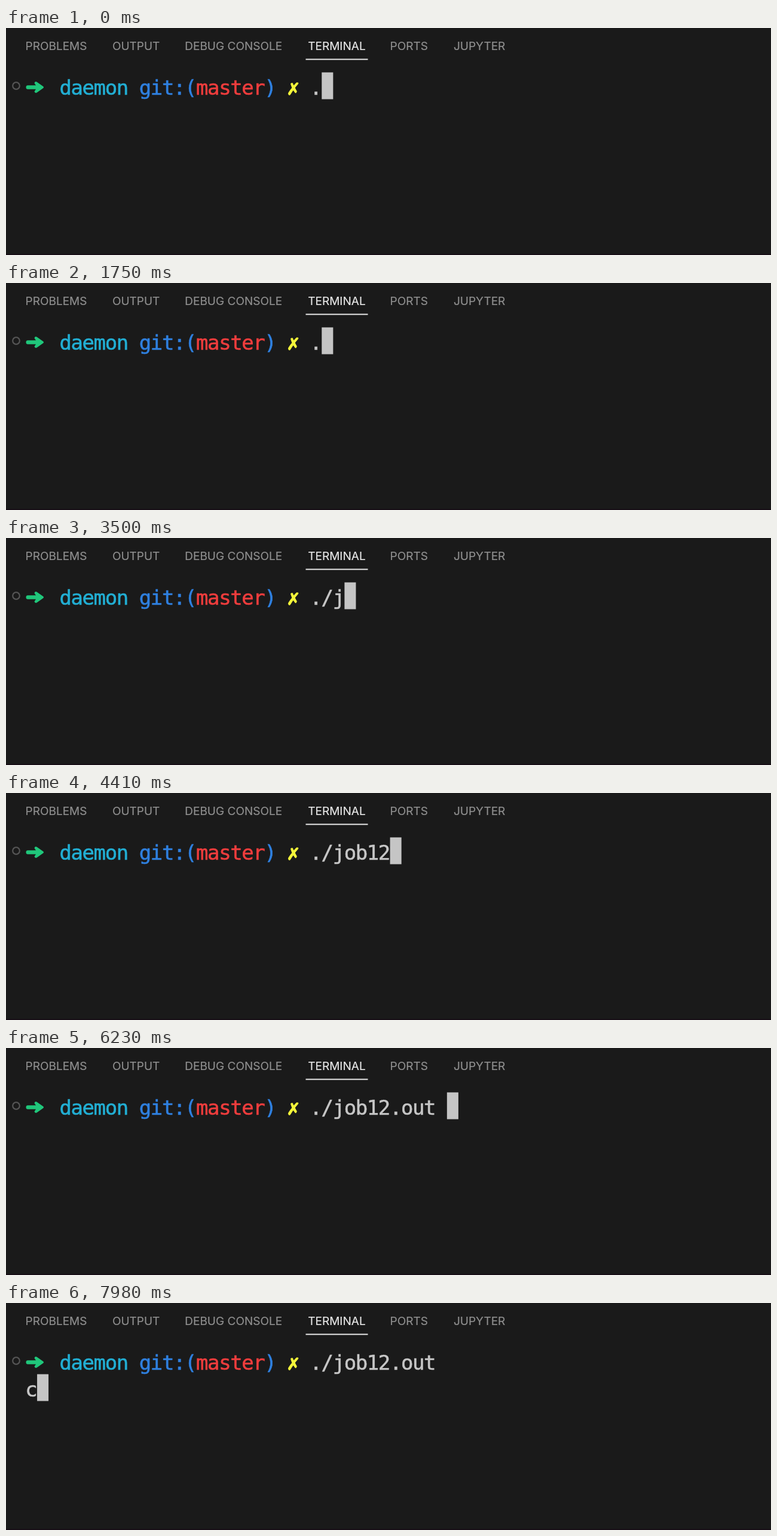
Recreate the animation shown at these times as an HTML page. Size 1280 by 381 pixels, loop 8 s.

```html
<!DOCTYPE html>
<html lang="en">
<head>
<meta charset="utf-8">
<title>Terminal</title>
<style>
  html, body { margin: 0; width: 100%; height: 100%; overflow: hidden; background: #1a1a1a; }
  svg { display: block; width: 100%; height: 100%; }
  .tab { font: 19px Inter, "Liberation Sans", sans-serif; stroke-width: 0.2; }
  .term { font: 34px "DejaVu Sans Mono", monospace; letter-spacing: -1.42px; white-space: pre; stroke-width: 0.6; }
</style>
</head>
<body>
<svg id="stage" viewBox="0 0 1280 381">
  <rect width="1280" height="381" fill="#1a1a1a"/>
  <rect y="379" width="1280" height="2" fill="#170f16"/>
  <g id="tabs"></g>
  <rect x="501.5" y="51.6" width="104" height="2" fill="#e7e7e7"/>
  <circle cx="17" cy="97" r="5.8" fill="none" stroke="#555" stroke-width="2.2"/>
  <path d="M36.5 96.2H50L47.5 92.5Q48.5 89 51.5 90.5L62.5 98.2Q63.7 99.5 62.5 100.8L51.5 108.5Q48.5 110 47.5 106.5L50 102.8H36.5Q33.5 102.8 33.5 99.5T36.5 96.2Z" fill="#20c77b"/>
  <g id="term"></g>
  <rect id="caret" width="19.05" height="45" fill="#c5c5c5"/>
  <path id="mouse" d="M1 1.5V27L7 21.3L11 31L15 29.3L11 19.8H18.5Z" fill="#111" stroke="#fff" stroke-width="1.9" stroke-linejoin="miter"/>
</svg>
<script>
const LOOP = 8000, STEP = 70;
const LEFT = 33, TOP = 74.5, CELL = 19.05, LINE = 45, BASE = 37.3;
const BEARING = -0.7; // centres the tightened glyphs in their cells
const $ = id => document.getElementById(id);

function addText(parent, cls, x, y, str, color) {
  const el = document.createElementNS("http://www.w3.org/2000/svg", "text");
  el.setAttribute("class", cls);
  el.setAttribute("x", x);
  el.setAttribute("y", y);
  el.style.fill = el.style.stroke = color;
  el.textContent = str;
  parent.appendChild(el);
  return el;
}

const cell = (col, row, str, color = "#c6c6c6") =>
  addText($("term"), "term", LEFT + BEARING + col * CELL, TOP + BASE + row * LINE, str, color);

[["PROBLEMS", 32.6], ["OUTPUT", 177.9], ["DEBUG CONSOLE", 299.3],
 ["TERMINAL", 505.3], ["PORTS", 642.6], ["JUPYTER", 749]].forEach(([name, x]) =>
  addText($("tabs"), "tab", x, 37.3, name, name === "TERMINAL" ? "#e7e7e7" : "#8e8e8e"));

cell(3, 0, "daemon", "#22afd4");
cell(10, 0, "git:(", "#2f80e0");
cell(15, 0, "master", "#ef3d3d");
cell(21, 0, ")", "#2f80e0");
cell(23, 0, "✗", "#f4f53a").style.strokeWidth = 1.2;

const CMD_COL = 25;
const command = cell(CMD_COL, 0, "");
const input = cell(0, 1, "");

// Command line contents from each moment on; the last jump is tab completion.
const typed = [
  [0, "."], [2030, ""], [2870, "."], [3080, "./"], [3360, "./j"],
  [3710, "./jo"], [3850, "./job"], [4060, "./job1"], [4270, "./job12"],
  [4620, "./job12.out "]
];
const ENTER = 6300, REPLY = 7840;

// Pointer keys: time, x, y
const path = [[1050, 1010, 223], [1190, 962, 212], [1680, 921, 186]];
const HIDE = 1750;

function pointerAt(t) {
  let i = 0;
  while (i < path.length - 2 && t >= path[i + 1][0]) i++;
  const [t0, x0, y0] = path[i], [t1, x1, y1] = path[i + 1];
  const k = Math.min(1, (t - t0) / (t1 - t0));
  const e = 1 - (1 - k) * (1 - k);
  return [x0 + (x1 - x0) * e, y0 + (y1 - y0) * e];
}

function draw(time) {
  const t = Math.floor((time % LOOP) / STEP) * STEP;
  const text = typed.filter(k => k[0] <= t).pop()[1];
  const entered = t >= ENTER;
  const reply = t >= REPLY ? "c" : "";
  command.textContent = text;
  input.textContent = reply;

  const col = entered ? reply.length : CMD_COL + text.length;
  $("caret").setAttribute("x", LEFT + col * CELL);
  $("caret").setAttribute("y", TOP + (entered ? LINE : 0));

  const shown = t >= path[0][0] && t < HIDE;
  $("mouse").style.display = shown ? "" : "none";
  if (shown) $("mouse").setAttribute("transform", `translate(${pointerAt(t)})`);
}

function tick() {
  draw(performance.now());
  requestAnimationFrame(tick);
}
tick();
</script>
</body>
</html>
```
